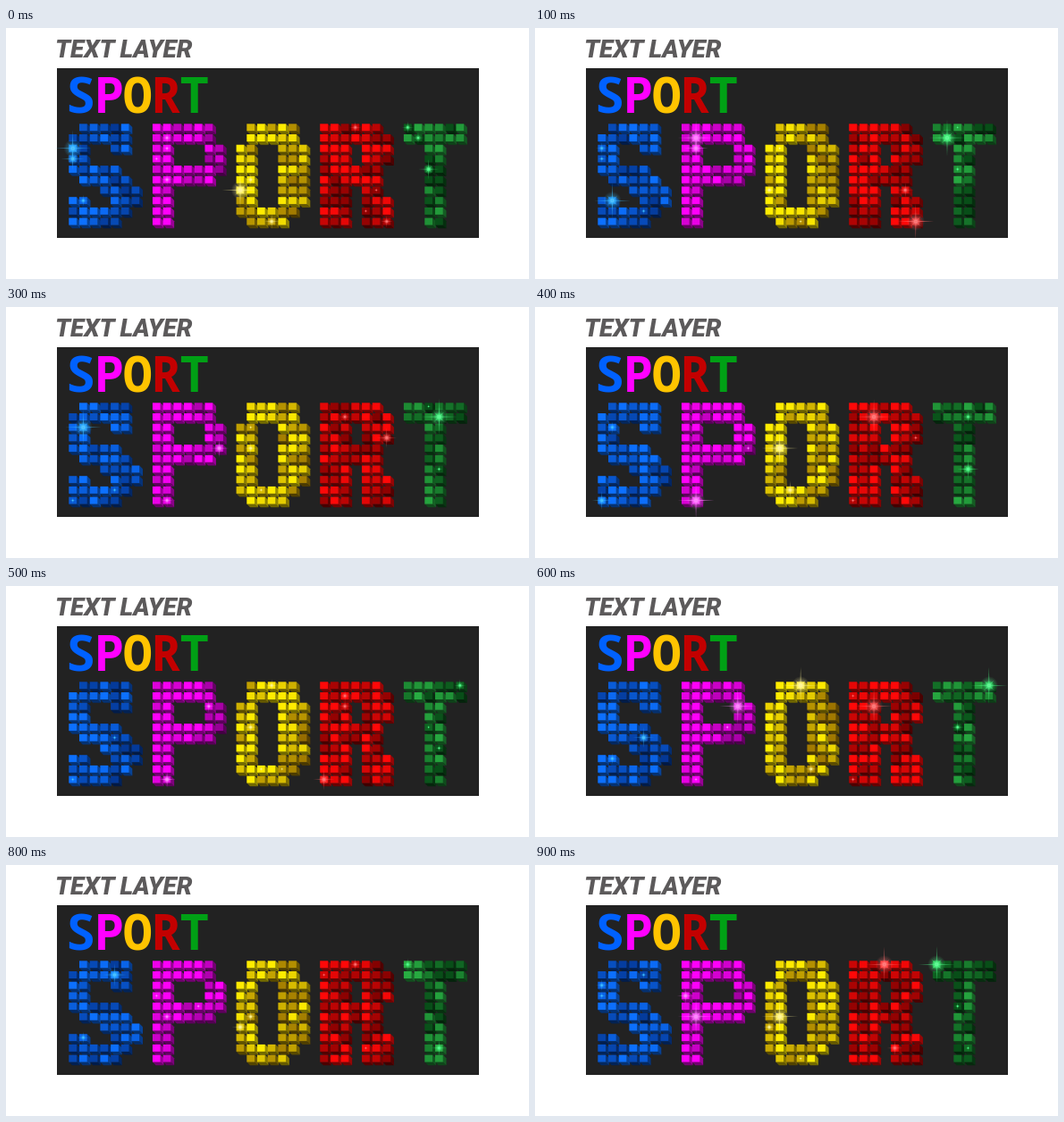
Recreate the animation shown at these times as an HTML page with a canvas. Size 585x281 px, loop 1 s.

```html
<!DOCTYPE html>
<html lang="en">
<head>
<meta charset="utf-8">
<title>Text layer</title>
<style>
html, body { margin: 0; width: 100%; height: 100%; overflow: hidden; background: #fff; }
canvas, svg { position: absolute; left: 0; top: 0; width: 585px; height: 281px; }
.title { font: italic 800 28px Roboto, sans-serif; letter-spacing: -.1px; fill: #5c5a5b; }
.word { font: 900 55px "Noto Sans Mono", monospace; letter-spacing: -1.2px; }
</style>
</head>
<body>
<canvas id="stage" width="585" height="281"></canvas>
<svg viewBox="0 0 585 281">
  <text class="title" x="55" y="33">TEXT LAYER</text>
  <text class="word" x="67" y="95"><tspan fill="#0061ff">S</tspan><tspan fill="#f0f">P</tspan><tspan fill="#ffc400">O</tspan><tspan fill="#c30000">R</tspan><tspan fill="#00a015">T</tspan></text>
</svg>
<script>
const ctx = document.getElementById('stage').getContext('2d');
const LEFT = 70.3, TOP = 107.3, ADVANCE = 93.65, PITCH = 11.7;
const FACE_W = 8.8, FACE_H = 8, DEPTH = 3.7;
const STEP = 100, STEPS = 10, SMALL_STARS = 5;

// stars: [column, row, step at which it is brightest]
const letters = [
  { dark: [4, 56, 150], light: [12, 112, 255], glow: '60,190,255', base: .7, slope: .04,
    rows: ['.#####', '######', '##..##', '##', '#####', '.#####', '...####', '##..###', '######', '#####'],
    stars: [[0, 2, 0], [1, 7, 1], [1, 2, 3], [1, 7, 7]] },
  { dark: [140, 0, 140], light: [255, 0, 250], glow: '255,130,255', base: 1.1, slope: .08,
    rows: ['######', '######', '##...##', '##...##', '#######', '######', '##', '##', '##', '##'],
    stars: [[1, 1, 1], [1, 9, 4], [5, 2, 6], [1, 5, 9]] },
  { dark: [150, 108, 0], light: [255, 236, 0], glow: '255,245,150', base: .9, slope: .06,
    rows: ['.#####', '.#####', ...Array(6).fill('##..###'), '######', '.####'],
    stars: [[0, 6, 0], [1, 4, 4], [3, 0, 6], [1, 5, 9]] },
  { dark: [120, 0, 0], light: [255, 8, 8], glow: '255,110,110', base: .75, slope: .03,
    rows: ['######', '#######', '###.###', '###.###', '######', '######', '###.##', ...Array(3).fill('###.###')],
    stars: [[6, 9, 1], [2, 1, 4], [2, 2, 6], [3, 0, 9]] },
  { dark: [8, 78, 24], light: [40, 172, 66], glow: '80,255,140', base: .55, slope: .05,
    rows: ['######', '######', ...Array(8).fill('..##')],
    stars: [[1, 1, 1], [3, 1, 3], [5, 0, 6], [0, 0, 9]] }
];

const noise = (...seed) => {
  const v = Math.sin(seed.reduce((sum, n, i) => sum + n * (12.99 + 21.7 * i), 1)) * 43758.5;
  return v - Math.floor(v);
};
const clamp = v => Math.max(0, Math.min(1, v));

letters.forEach((l, i) => {
  l.x = LEFT + i * ADVANCE;
  l.cells = l.rows.flatMap((row, r) =>
    [...row].flatMap((c, col) => c === '#' ? [[col, r]] : []));
  l.stars = l.stars.map(([col, row, peak]) => ({ col, row, peak, size: 6 }));
  for (let k = 0; k < SMALL_STARS; k++) {
    const [col, row] = l.cells[Math.floor(noise(i, k, 3) * l.cells.length)];
    l.stars.push({ col, row, peak: (2 * k + i) % STEPS, size: 2 + 2 * noise(i, k, 7) });
  }
});

function shade(l, level, k = 1) {
  return `rgb(${l.dark.map((d, i) => Math.round((d + (l.light[i] - d) * level) * k))})`;
}

function poly(color, ...p) {
  ctx.fillStyle = color;
  ctx.beginPath();
  for (let i = 0; i < p.length; i += 2) ctx.lineTo(p[i], p[i + 1]);
  ctx.fill();
}

function drawLetter(l, index, step) {
  const cubes = l.cells.map(([col, row]) => ({
    x: l.x + col * PITCH,
    y: TOP + row * PITCH,
    level: clamp(l.base - col * l.slope + (noise(index, row, col, step) - .5) * 1.1)
  }));
  for (const { x, y, level } of cubes) {
    const r = x + FACE_W, b = y + FACE_H;
    poly(shade(l, level, .45), x, b, r, b, r + DEPTH, b + DEPTH, x + DEPTH, b + DEPTH);
    poly(shade(l, level, .6), r, y, r + DEPTH, y + DEPTH, r + DEPTH, b + DEPTH, r, b);
  }
  for (const { x, y, level } of cubes) {
    ctx.fillStyle = shade(l, level);
    ctx.fillRect(x, y, FACE_W, FACE_H);
  }
}

function drawStar(x, y, size, glow) {
  const ray = size * 3.4, r = size * 1.7;
  const g = ctx.createRadialGradient(x, y, 0, x, y, r);
  g.addColorStop(0, 'rgba(255,255,255,.9)');
  g.addColorStop(.25, `rgba(${glow},.8)`);
  g.addColorStop(.55, `rgba(${glow},.28)`);
  g.addColorStop(1, `rgba(${glow},0)`);
  ctx.fillStyle = g;
  ctx.fillRect(x - r, y - r, 2 * r, 2 * r);
  for (let i = 0; i < 8; i++) {
    const a = i * Math.PI / 4, len = i % 2 ? ray * .4 : ray;
    const c = Math.cos(a), s = Math.sin(a), t = .2 + size * .06;
    poly(`rgba(${glow},.7)`, x - s * t, y + c * t, x + c * len, y + s * len, x + s * t, y - c * t);
  }
}

// Full at the peak, a third one step away, then gone
function pulse(step, peak) {
  const d = Math.abs(step - peak);
  return Math.max(0, 1 - Math.min(d, STEPS - d) / 1.5);
}

function draw(now) {
  const step = Math.floor(now / STEP) % STEPS;
  ctx.fillStyle = '#fff';
  ctx.fillRect(0, 0, 585, 281);
  ctx.fillStyle = '#222';
  ctx.fillRect(57, 45, 472, 190);
  letters.forEach((l, i) => drawLetter(l, i, step));
  for (const l of letters)
    for (const { col, row, peak, size } of l.stars) {
      const s = size * pulse(step, peak);
      if (s) drawStar(l.x + col * PITCH + FACE_W / 2, TOP + row * PITCH + FACE_H / 2, s, l.glow);
    }
}

const start = performance.now();
function tick() {
  draw(performance.now() - start);
  requestAnimationFrame(tick);
}
tick();
</script>
</body>
</html>
```
